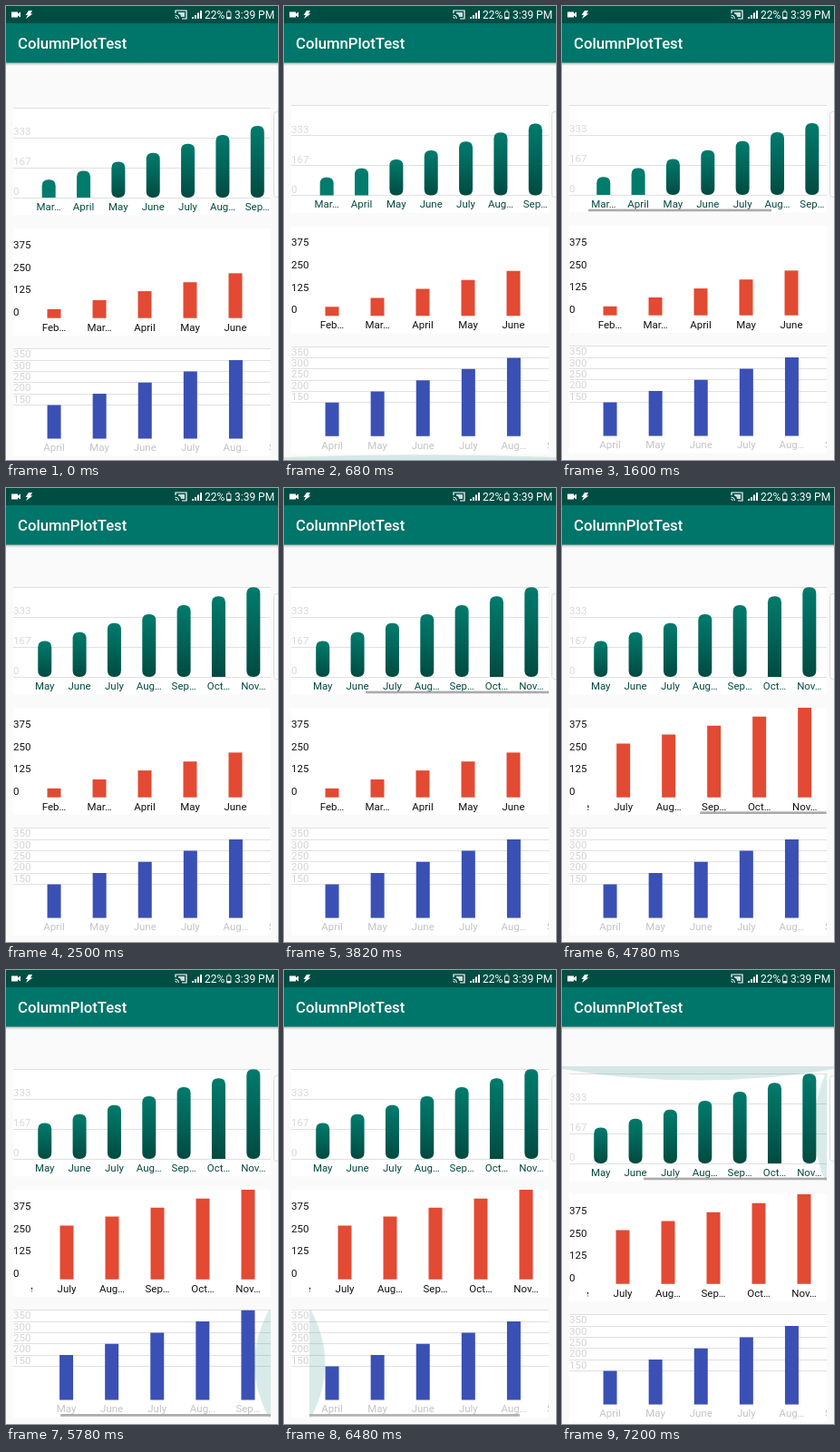
These frames come from a looping animation (300x500 px, 7.22 s). An HTML page:

```html
<!DOCTYPE html>
<html lang="en">
<head>
<meta charset="utf-8">
<title>Scrolling bar charts</title>
<style>
  html, body { margin: 0; width: 100%; height: 100%; overflow: hidden; background: #fafafa; }
  svg { display: block; width: 300px; height: 500px; font-family: Roboto, sans-serif; font-size: 11.5px; }
  .glow { fill: #00796b; opacity: .15; }
  .thumb { fill: #ababab; }
  .line { fill: #e0e0e0; shape-rendering: crispEdges; }
  .mid { text-anchor: middle; }
</style>
</head>
<body>
<svg viewBox="0 0 300 500">
  <defs>
    <linearGradient id="teal" x2="0" y2="1">
      <stop stop-color="#007b6c"/><stop offset=".5" stop-color="#006458"/><stop offset="1" stop-color="#004a40"/>
    </linearGradient>
    <linearGradient id="shade" x2="0" y2="1">
      <stop stop-color="#777" stop-opacity=".5"/><stop offset="1" stop-color="#777" stop-opacity="0"/>
    </linearGradient>
    <clipPath id="view"><rect y="105" width="300" height="395"/></clipPath>
    <clipPath id="plot"><rect x="28" y="-1" width="264" height="121"/></clipPath>
  </defs>

  <rect width="300" height="500" fill="#fafafa"/>
  <g clip-path="url(#view)">
    <g id="page"></g>
    <g transform="translate(0 106)"><path id="topGlow" class="glow" d="M0 0V3Q150 29 300 3V0Z"/></g>
    <g transform="translate(0 500)"><path id="endGlow" class="glow" d="M0 0V-3Q150-9 300-3V0Z"/></g>
  </g>
  <rect x="295.5" y="116.5" width="9" height="94" rx="3" fill="#fcfcfc" stroke="#dcdcdc"/>

  <rect y="62" width="300" height="4" fill="url(#shade)"/>
  <rect y="19" width="300" height="43.5" fill="#007569"/>
  <rect width="300" height="19" fill="#004d44"/>
  <text x="13" y="46.5" fill="#fff" font-size="16.7" font-weight="500">ColumnPlotTest</text>

  <g fill="#fff">
    <path d="M6 6.5h7v2l3-2v6l-3-2v2H6Z"/>
    <path d="M25 5h4l-2 3.5h2.5L22 14l2-4h-2.5Z"/>
    <path d="M187 8V5h12v9h-5" fill="none" stroke="#fff" stroke-width="1.2"/>
    <path d="M186.5 10q4 0 4 4M186.5 12.3q1.7 0 1.7 1.7" fill="none" stroke="#fff"/>
    <path d="M190 7h7v5h-4q0-3-3-3.5Z" opacity=".8"/>
    <path d="M205 12h2v2h-2ZM208 10h2v4h-2ZM211 7.500h2v6.500h-2ZM214 5h2v9h-2Z"/>
    <path d="M243.500 6.500h4.500v7.500h-4.500ZM244.500 5h2.500" fill="none" stroke="#fff" stroke-width=".8"/>
    <rect x="244" y="12" width="4" height="2"/>
    <text x="219" y="14" font-size="12">22%</text>
    <text x="252" y="14" font-size="12">3:39 PM</text>
  </g>
</svg>

<script>
const LOOP = 7220, VIEW = 264, BASE = 98.7;
const MONTHS = ['Feb…', 'Mar…', 'April', 'May', 'June', 'July', 'Aug…', 'Sep…', 'Oct…', 'Nov…'];
const SQUARE_FOOT = /Mar|April|Oct/;
const $ = id => document.getElementById(id);

function add(parent, tag, attrs, text) {
  const el = document.createElementNS('http://www.w3.org/2000/svg', tag);
  for (const k in attrs) el.setAttribute(k, attrs[k]);
  if (text !== undefined) el.textContent = text;
  parent.append(el);
  return el;
}
const set = (el, transform) => el.setAttribute('transform', transform);

const clamp = x => Math.min(1, Math.max(0, x));
const ease = x => (x = clamp(x)) * x * (3 - 2 * x);

// A swipe moves from the current position to `to`.
const swipe = (start, end, to) => ({ start, end, to });
const position = (t, swipes, from) =>
  swipes.reduce((p, s) => p + (s.to - p) * ease((t - s.start) / (s.end - s.start)), from);

// The edge glow swells after a swipe ends; the thumb lingers, then fades.
const glowAt = (t, end) => ease(1 - Math.abs(t - end - 200) / 200);
const thumbAt = (t, s) => clamp((t - s.start) / 40 + 1) * clamp((s.end + 420 - t) / 220);
const peak = (list, f) => Math.max(0, ...list.map(f));

function barPath(x, h, round, square) {
  const top = BASE - h;
  if (!round) return `M${x} ${top}h15V${BASE}h-15Z`;
  const foot = square ? `V${BASE}h-15` : `V${BASE - 7}q0 7-7 7h-1q-7 0-7-7`;
  return `M${x} ${top + 7}q0-7 7-7h1q7 0 7 7${foot}Z`;
}

// Builds a chart and returns its update function.
function chart(c, row) {
  const g = add($('page'), 'g', { transform: `translate(0 ${109.3 + 132.7 * row})` });
  add(g, 'rect', { x: 8, width: 284, height: 118, fill: '#fff' });
  const yOf = v => BASE * (1 - v / c.max);
  for (let v = c.min; v <= c.max + 1; v += c.tick) {
    if (c.lines) add(g, 'rect', { class: 'line', x: 8, y: yOf(v) - .5, width: 284, height: 1 });
    if (v < c.max - 1) add(g, 'text', { x: 8, y: yOf(v) - 2.7, fill: c.tickFill }, Math.round(v));
  }

  const width = c.step * c.count, range = width - VIEW;
  const bars = add(add(g, 'g', { 'clip-path': 'url(#plot)' }), 'g', {});
  MONTHS.slice(c.first, c.first + c.count).forEach((name, i) => {
    const mid = 28 + c.step * (i + .5);
    const h = BASE * 50 * (c.first + i + 1) / 500 * 500 / c.max;
    const fill = c.round && h < 35 ? '#007b6c' : c.fill;
    add(bars, 'path', { d: barPath(mid - 7.5, h, c.round, SQUARE_FOOT.test(name)), fill });
    add(bars, 'text', { x: mid, y: 112.5, class: 'mid', fill: c.text }, name);
  });

  const edge = (x, dir) => add(add(g, 'g', { transform: `translate(${x} 0) scale(${dir} 1)` }),
    'path', { class: 'glow', d: 'M0 0H2Q34 59 2 118H0Z' });
  const left = edge(28, 1), right = edge(292, -1);
  const thumb = add(g, 'rect', { class: 'thumb', x: 28, y: 114.3, width: VIEW * VIEW / width, height: 2.7 });

  return t => {
    const x = range * position(t, c.swipes, 0);
    const glow = to => peak(c.swipes.filter(s => s.to === to), s => glowAt(t, s.end));
    set(bars, `translate(${-x} 0)`);
    set(thumb, `translate(${x * VIEW / width} 0)`);
    set(left, `scale(${glow(0)} 1)`);
    set(right, `scale(${glow(1)} 1)`);
    thumb.setAttribute('opacity', peak(c.swipes, s => thumbAt(t, s)));
  };
}

const updates = [
  {
    min: 0, max: 500, tick: 500 / 3, lines: true, first: 1, count: 9, step: 38.35, round: true,
    fill: 'url(#teal)', text: '#06493f', tickFill: '#d9d9d9',
    swipes: [swipe(1560, 2080, 1), swipe(2740, 3140, 0), swipe(3300, 3820, 1), swipe(6960, 7060, 1)]
  },
  {
    min: 0, max: 500, tick: 125, first: 0, count: 10, step: 50,
    fill: '#e24a33', text: '#111', tickFill: '#111',
    swipes: [swipe(4180, 4800, 1)]
  },
  {
    min: 150, max: 400, tick: 50, lines: true, first: 2, count: 6, step: 50.1,
    fill: '#3b50b4', text: '#c4c4c4', tickFill: '#d4d4d4',
    swipes: [swipe(5140, 5580, 1), swipe(5920, 6260, 0)]
  }
].map(chart);

const pageSwipes = [swipe(0, 900, 0), swipe(6640, 6960, 5)];

function draw(now) {
  const t = now % LOOP;
  updates.forEach(update => update(t));
  set($('page'), `translate(0 ${position(t, pageSwipes, 3)})`);
  set($('topGlow'), `scale(1 ${glowAt(t, 6980)})`);
  set($('endGlow'), `scale(1 ${glowAt(t, 500)})`);
}

const begin = performance.now();
function frame() {
  draw(performance.now() - begin);
  requestAnimationFrame(frame);
}
frame();
</script>
</body>
</html>
```
